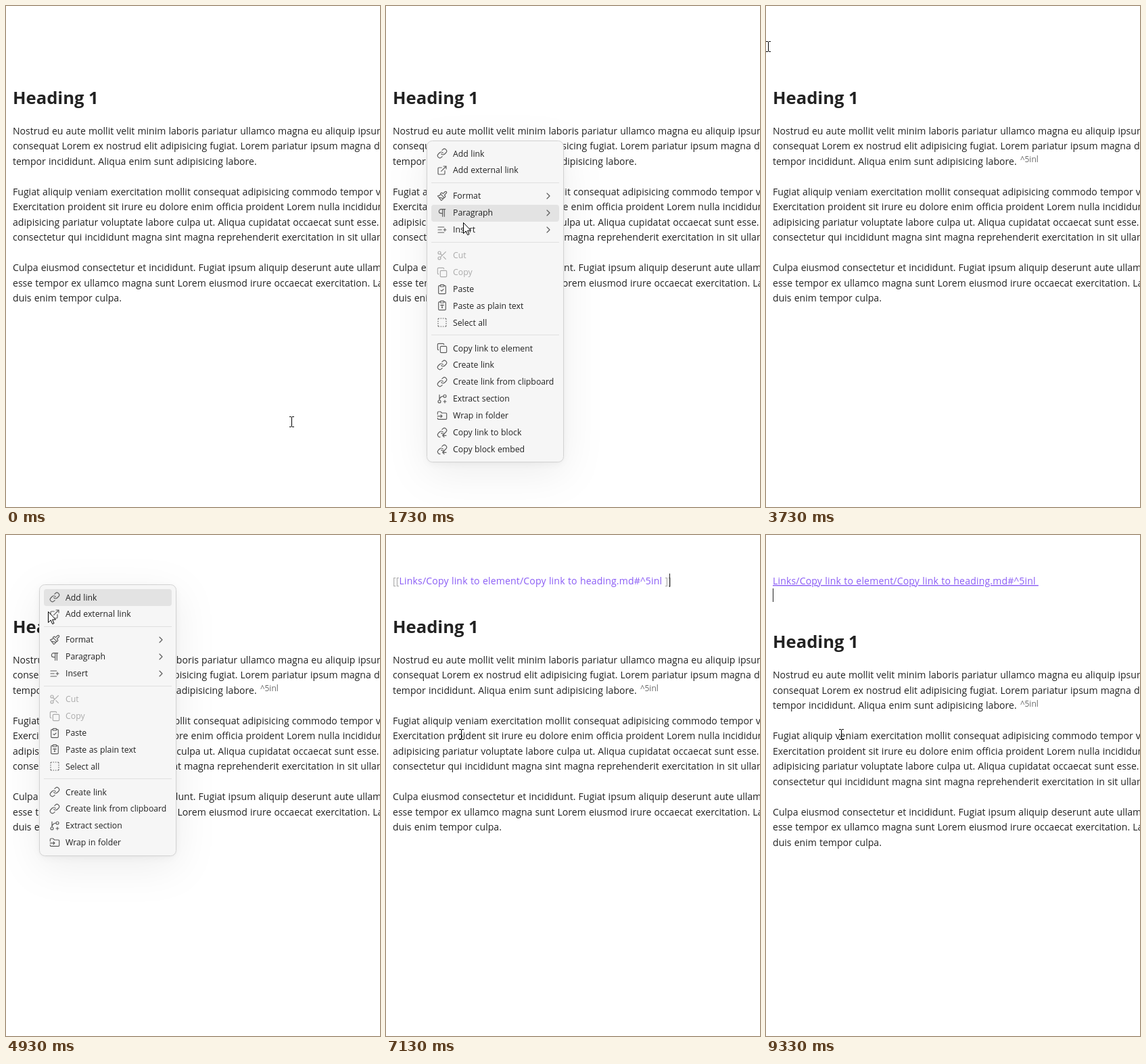
Write an HTML page that moves like this. It is 553x741 px and loops after 9540 ms.

```html
<!DOCTYPE html>
<html lang="en">
<head>
<meta charset="utf-8">
<title>Copy link to element</title>
<style>
html, body { margin: 0; width: 100%; height: 100%; overflow: hidden; background: #fff; }
svg { display: block; }
text { font-family: "Open Sans", "Noto Sans", sans-serif; fill: #222; white-space: pre; }
.body text { font-size: 14.08px; word-spacing: .43px; }
.body .title { font-size: 25.6px; font-weight: 700; word-spacing: 0; }
.body .id { font-size: 12px; fill: #686868; }
.body .link { fill: #8a5cf5; letter-spacing: .15px; }
.underlined { text-decoration: underline 1px; text-underline-offset: 2px; }
.mark { fill: #ababab; }
.menu text { font-size: 12.25px; word-spacing: .36px; }
.menu .off text { fill: #ababab; }
.panel { fill: #f6f6f6; stroke: #d2d2d2; filter: drop-shadow(0 1px 2px #00000007) drop-shadow(0 3.4px 6.7px #0000000b) drop-shadow(0 15px 30px #00000012); }
.icon { fill: none; stroke: #5c5c5c; stroke-width: 1.75; stroke-linecap: round; stroke-linejoin: round; }
.off .icon { stroke: #ababab; }
.hover { fill: #e3e3e3; }
.rule { fill: #e0e0e0; }
</style>
</head>
<body>
<svg id="stage" width="553" height="741" viewBox="0 0 553 741"></svg>
<script>
const LOOP = 9540, STEP = 200 / 3, ROW = 24.9, GAP = 13;
const stage = document.getElementById("stage");

function add(parent, tag, attrs = {}, text) {
  const el = document.createElementNS("http://www.w3.org/2000/svg", tag);
  for (const k in attrs) el.setAttribute(k, attrs[k]);
  if (text) el.textContent = text;
  parent.append(el);
  return el;
}
const show = (el, on) => el.setAttribute("visibility", on ? "visible" : "hidden");

// Document
const lines = [
  "Nostrud eu aute mollit velit minim laboris pariatur ullamco magna eu aliquip ipsum",
  "consequat Lorem ex nostrud elit adipisicing fugiat. Lorem pariatur ipsum magna do",
  "tempor incididunt. Aliqua enim sunt adipisicing labore.",
  "",
  "Fugiat aliquip veniam exercitation mollit consequat adipisicing commodo tempor veniam",
  "Exercitation proident sit irure eu dolore enim officia proident Lorem nulla incididunt",
  "adipisicing pariatur voluptate labore culpa ut. Aliqua cupidatat occaecat sunt esse.",
  "consectetur qui incididunt magna sint magna reprehenderit exercitation in sit ullamco",
  "",
  "Culpa eiusmod consectetur et incididunt. Fugiat ipsum aliquip deserunt aute ullamco",
  "esse tempor ex ullamco magna sunt Lorem eiusmod irure occaecat exercitation. Labore",
  "duis enim tempor culpa."
];
const doc = add(stage, "g", { class: "body" });
const placed = [[add(doc, "text", { x: 10, class: "title" }, "Heading 1"), 145]];
lines.forEach((s, i) => s && placed.push([add(doc, "text", { x: 10 }, s), 190 + 22.5 * i]));
const blockId = add(doc, "text", { x: 376, class: "id" }, "^5inl");
placed.push([blockId, 231.5]);

const path = "Links/Copy link to element/Copy link to heading.md#^5inl ";
const raw = add(doc, "text", { x: 10, y: 73, class: "link" });
add(raw, "tspan", { class: "mark" }, "[[");
add(raw, "tspan", {}, path);
add(raw, "tspan", { class: "mark" }, "]]");
const link = add(doc, "text", { x: 10, y: 73, class: "link underlined" }, path);
const caret = add(stage, "rect", { width: 1, height: 20, fill: "#222" });

// Icons on a 24 unit grid
const upperLink = "M10 13a5 5 0 0 0 7.54.54l3-3a5 5 0 0 0-7.07-7.07l-1.72 1.71";
const board = "M9 2h6a1 1 0 0 1 1 1v2a1 1 0 0 1-1 1H9a1 1 0 0 1-1-1V3a1 1 0 0 1 1-1zM16 4h2a2 2 0 0 1 2 2v14a2 2 0 0 1-2 2H6a2 2 0 0 1-2-2V6a2 2 0 0 1 2-2h2";
const icons = {
  link: upperLink + "M14 11a5 5 0 0 0-7.54-.54l-3 3a5 5 0 0 0 7.07 7.07l1.71-1.71",
  external: "M15 3h6v6M10 14 21 3M18 13v6a2 2 0 0 1-2 2H5a2 2 0 0 1-2-2V8a2 2 0 0 1 2-2h6",
  brush: "M18.37 2.63 14 7l-1.59-1.59a2 2 0 0 0-2.82 0L8 7l9 9 1.59-1.59a2 2 0 0 0 0-2.82L17 10l4.37-4.37a2.12 2.12 0 1 0-3-3ZM9 8c-2 3-4 3.5-7 4l8 10c2-1 6-5 6-7M14.5 17.5 4.5 15",
  pilcrow: "M13 4v16M17 4v16M19 4H9.5a4.5 4.5 0 0 0 0 9H13",
  insert: "M11 12H3M16 6H3M16 18H3M18 9v6M21 12h-6",
  cut: "M9 6a3 3 0 1 1-6 0 3 3 0 0 1 6 0zM9 18a3 3 0 1 1-6 0 3 3 0 0 1 6 0zM8.12 8.12 12 12M20 4 8.12 15.88M14.8 14.8 20 20",
  copy: "M10 8h10a2 2 0 0 1 2 2v10a2 2 0 0 1-2 2H10a2 2 0 0 1-2-2V10a2 2 0 0 1 2-2zM4 16c-1.1 0-2-.9-2-2V4c0-1.1.9-2 2-2h10c1.1 0 2 .9 2 2",
  paste: board + "M9 14l2 2 4-4",
  plain: board + "M9 12v-1h6v1M11 17h2M12 11v6",
  select: "M5 3a2 2 0 0 0-2 2M19 3a2 2 0 0 1 2 2M21 19a2 2 0 0 1-2 2M5 21a2 2 0 0 1-2-2M9 3h1M9 21h1M14 3h1M14 21h1M3 9v1M21 9v1M3 14v1M21 14v1",
  branch: "M6 3v12M18 9a3 3 0 1 0 0-6 3 3 0 0 0 0 6zM6 21a3 3 0 1 0 0-6 3 3 0 0 0 0 6zM15 6a9 9 0 0 0-9 9M18 15v6M21 18h-6",
  folder: "M2 9V5a2 2 0 0 1 2-2h3.93a2 2 0 0 1 1.66.9l.82 1.2a2 2 0 0 0 1.66.9H20a2 2 0 0 1 2 2v10a2 2 0 0 1-2 2H4a2 2 0 0 1-2-2v-1M2 13h10M9 16l3-3-3-3",
  block: upperLink + "M14 11a5 5 0 0 0-7.54-.54l-3 3a5 5 0 0 0 4 8.4M21 18.5h-8M16.5 15 13 18.5l3.5 3.5",
  more: "M9 18l6-6-6-6"
};

// Menus: groups of [icon, label, kind]
const common = [
  [["link", "Add link"], ["external", "Add external link"]],
  [["brush", "Format", "sub"], ["pilcrow", "Paragraph", "sub"], ["insert", "Insert", "sub"]],
  [["cut", "Cut", "off"], ["copy", "Copy", "off"], ["paste", "Paste"], ["plain", "Paste as plain text"], ["select", "Select all"]]
];
const tools = [["link", "Create link"], ["link", "Create link from clipboard"], ["branch", "Extract section"], ["folder", "Wrap in folder"]];
const blockTools = [["copy", "Copy link to element"], ...tools, ["block", "Copy link to block"], ["block", "Copy block embed"]];

function makeMenu(left, top, groups, from, to) {
  const g = add(stage, "g", { class: "menu" });
  const panel = add(g, "rect", { x: left + .5, y: top + .5, width: 202, rx: 8, class: "panel" });
  const hover = add(g, "rect", { x: left + 7, width: 189, height: 25, rx: 4, class: "hover" });
  const rows = [];
  const icon = (p, name, x, y) =>
    add(p, "path", { d: icons[name], class: "icon", transform: `translate(${x} ${y}) scale(${2 / 3})` });
  let y = top + 7;
  groups.forEach((group, i) => {
    if (i) {
      add(g, "rect", { x: left + 7, y: Math.floor(y + 6), width: 189, height: 1, class: "rule" });
      y += GAP;
    }
    for (const [name, label, kind] of group) {
      const row = add(g, "g", { class: kind || "" }), mid = y + ROW / 2;
      icon(row, name, left + 15, Math.round(mid - 8.2));
      add(row, "text", { x: left + 39, y: Math.floor(mid + 4.6) }, label);
      if (kind === "sub") icon(row, "more", left + 172, Math.round(mid - 8.2));
      if (kind !== "off") rows.push(y);
      y += ROW;
    }
  });
  panel.setAttribute("height", Math.round(y + 6 - top));
  return { g, hover, rows, left, from, to };
}
const menus = [
  makeMenu(60, 199, [...common, blockTools], 870, 2800),
  makeMenu(49, 73, [...common, tools], 4600, 6070)
];

// Pointer
const arrow = add(stage, "path", { d: "M.5.5v16l3.7-3.6 2.5 5.7 2.3-1-2.4-5.5h4.9z", fill: "#fff", stroke: "#000" });
const beam = add(stage, "path", { d: "M-3.5-7.5h3m1 0h3M0-7v14M-3.5 7.5h3m1 0h3", fill: "none", stroke: "#000" });

// [time, x, y, eased towards the next point]
const route = [
  [0, 421, 614, 1], [333, 59, 197], [1333, 59, 197], [1733, 114, 320], [2133, 157, 514],
  [2267, 157, 514], [2467, 163, 506], [2933, 163, 506, 1], [3600, 12, 90], [3733, 2, 59],
  [3933, 51, 74], [4067, 48, 71], [4733, 48, 71], [4933, 62, 113], [5533, 106, 284],
  [5733, 110, 294], [LOOP, 110, 294]
];
function pointer(t) {
  const i = Math.max(1, route.findIndex(k => k[0] >= t));
  const a = route[i - 1], b = route[i];
  let f = Math.max(0, (t - a[0]) / (b[0] - a[0]));
  if (a[3]) f = f * f * (3 - 2 * f);
  return [1, 2].map(n => Math.round(a[n] + (b[n] - a[n]) * f));
}

// [from, to, x, y]
const blinks = [
  [4070, 4600, 10, 57], [5130, 5667, 10, 57], [6070, 6600, 419, 57], [7130, 7200, 419, 57],
  [7200, 7730, 10, 79], [8270, 8730, 10, 79], [9330, LOOP + 9, 10, 79]
];

function draw(now) {
  const at = Math.floor((now % LOOP + 4) / STEP) * STEP, t = at + 4;
  const shift = t >= 7200 ? 22.5 : 0;
  for (const [el, y] of placed) el.setAttribute("y", Math.floor(y + shift));
  show(blockId, t >= 2800);
  show(raw, t >= 6070 && t < 7200);
  show(link, t >= 7200);

  const blink = blinks.find(b => t >= b[0] && t < b[1]);
  show(caret, blink);
  if (blink) {
    caret.setAttribute("x", blink[2]);
    caret.setAttribute("y", blink[3]);
  }

  // The highlight trails the pointer by one step
  const [x, y] = pointer(at), [hx, hy] = pointer(Math.max(0, at - STEP));
  for (const m of menus) {
    const open = t >= m.from && t < m.to;
    m.g.style.display = open ? "" : "none";
    const row = m.rows.find(r => hy >= r && hy < r + ROW);
    const hit = row !== undefined && hx >= m.left + 7;
    show(m.hover, hit);
    if (hit) m.hover.setAttribute("y", Math.round(row));
  }
  const pointing = t >= 1400 && t < 2800 || t >= 4730 && t < 6070;
  show(arrow, pointing);
  show(beam, !pointing);
  arrow.setAttribute("transform", `translate(${x} ${y})`);
  beam.setAttribute("transform", `translate(${x + 1.5} ${y + 1})`);
}

let start;
function tick(now) {
  start ??= now;
  draw(now - start);
  requestAnimationFrame(tick);
}
draw(0);
requestAnimationFrame(tick);
</script>
</body>
</html>
```
